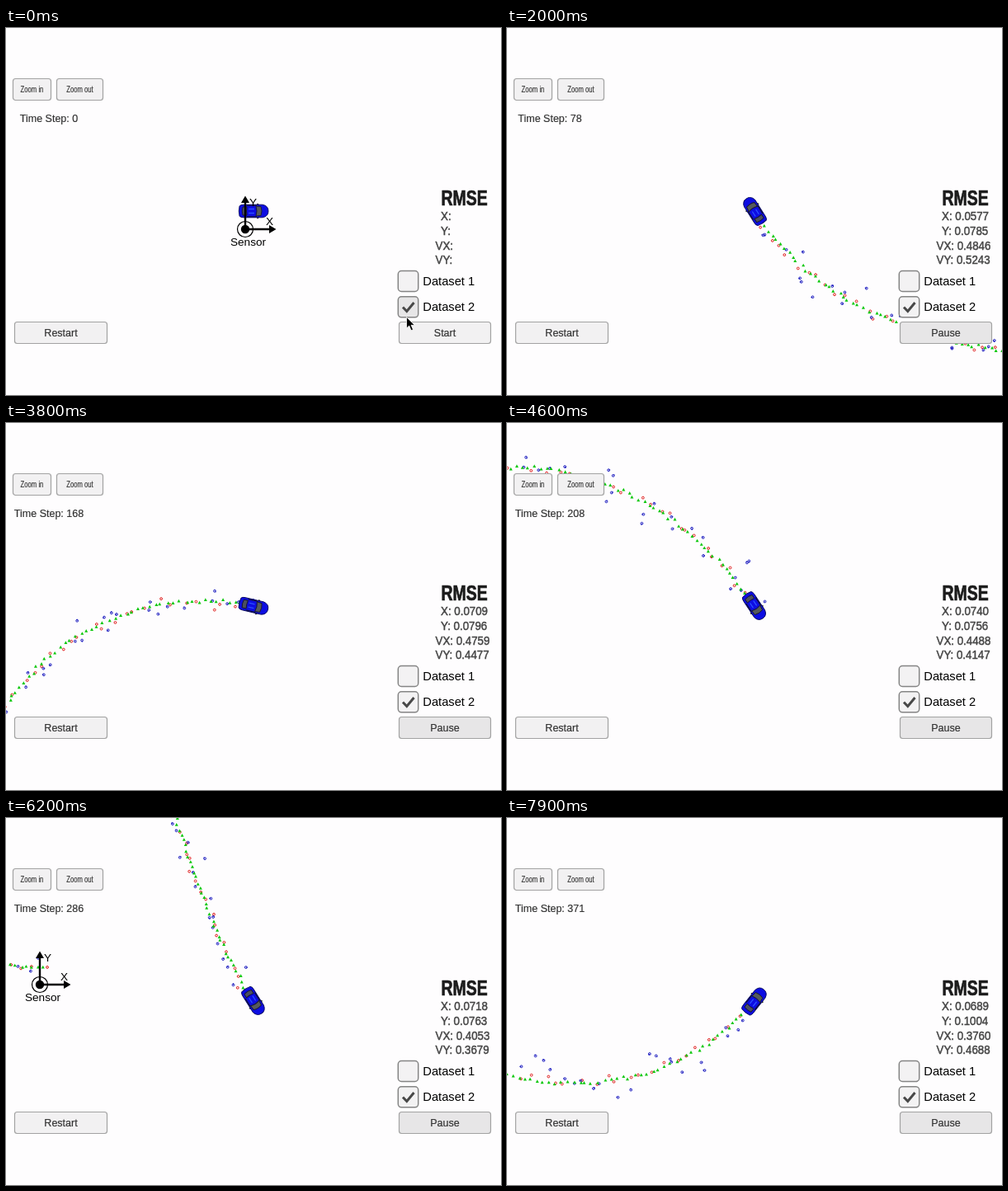
These frames come from a looping animation (600x445 px, 8000 ms). An HTML page:

```html
<!DOCTYPE html>
<html lang="en">
<head>
<meta charset="utf-8">
<title>Tracking simulator</title>
<style>
  html, body { margin: 0; width: 100%; height: 100%; overflow: hidden; background: #fefdfe; }
  svg { display: block; width: 100vw; height: 100vh; }
  text { font-family: "Liberation Sans", Arial, sans-serif; }
  .ui { fill: #333; stroke: #333; stroke-width: .2; font-size: 12.5px; text-anchor: middle; }
  .rmse { fill: #444; stroke: #444; stroke-width: .5; font-size: 15.5px; }
</style>
</head>
<body>
<svg id="stage" viewBox="0 0 600 445" xmlns="http://www.w3.org/2000/svg">
  <rect width="600" height="445" fill="#fefdfe"/>
  <g id="trail">
    <path id="lidar" fill="none" stroke="#e01818"/>
    <path id="radar" fill="none" stroke="#1a1ac0"/>
    <path id="track" fill="#0cc80c"/>
  </g>
  <g id="car">
    <path d="M4.5 -9L6.5 -7M4.5 9L6.5 7" stroke="#111" stroke-width="1.4"/>
    <path d="M-17 -6Q-16 -7.8 -12 -7.8L11 -7.8Q18 -6.5 18 0Q18 6.5 11 7.8L-12 7.8Q-16 7.8 -17 6Q-18.5 0 -17 -6Z" fill="#0d0de2" stroke="#0a0a60" stroke-width=".9"/>
    <path d="M-8 -6.8H4M-8 6.8H4" stroke="#101040" stroke-width="1.3"/>
    <path d="M3 -6L9 -5.5Q11 0 9 5.5L3 6Q5 0 3 -6Z" fill="#555a5c" stroke="#181830" stroke-width=".9"/>
    <path d="M-8 -5L-13 -5Q-14.5 0 -13 5L-8 5Q-9 0 -8 -5Z" fill="#4c5060" stroke="#181830" stroke-width=".9"/>
    <path d="M-6 -2.5H1M-6 2.5H1" stroke="#2b50ff" stroke-width="1.3"/>
  </g>
  <g id="sensor">
    <g stroke="#000" stroke-width="2.4">
      <path d="M0 0V-34M0 0H31"/>
      <circle r="9.5" fill="none" stroke-width="1.2"/>
    </g>
    <path d="M0 -40.5L5 -32H-5ZM37.5 0L29 -5V5Z"/>
    <circle r="5.2"/>
    <g font-size="13.6" text-anchor="middle">
      <text x="3.5" y="20">Sensor</text>
      <text x="29.5" y="-5.5">X</text>
      <text x="9.5" y="-28.5">Y</text>
    </g>
  </g>
  <g id="panel"></g>
  <path id="cursor" d="M0 0V13.5L3.2 10.6L5.6 16.2L8 15.2L5.6 9.8H9.8Z" fill="#000" stroke="#fff" stroke-width=".8"/>
</svg>
<script>
const $ = id => document.getElementById(id);
const panel = $('panel');
const LOOP = 8000, CAR = [300, 222];

function add(tag, attrs, text = '') {
  const el = document.createElementNS('http://www.w3.org/2000/svg', tag);
  for (const name in attrs) el.setAttribute(name, attrs[name]);
  el.textContent = text;
  return panel.appendChild(el);
}

function box(x, y, width, height, fill, rx = 3, stroke = '#a2a2a2', sw = 1.2) {
  return add('rect', { x, y, width, height, rx, fill, stroke, 'stroke-width': sw });
}

function button(x, y, w, h, label, narrow = 1) {
  const rect = box(x, y, w, h, '#f2f1f2');
  const size = narrow < 1 ? 11 : 12.5;
  const text = add('text', {
    class: 'ui', style: `font-size:${size}px`,
    transform: `translate(${x + w / 2} ${y + h / 2 + size * .35}) scale(${narrow} 1)`
  }, label);
  return { rect, text };
}

function checkbox(y, label) {
  const rect = box(475.3, y, 24.4, 25, '#f3f2f3', 4, '#858585', 1.5);
  add('text', { x: 505.3, y: y + 17.5, 'font-size': 14.7 }, label);
  return rect;
}

// Interface
button(8.5, 61.5, 46, 26, 'Zoom in', .7);
button(61.5, 61.5, 56, 26, 'Zoom out', .7);
button(10.5, 356.5, 112, 26, 'Restart');
const start = button(476.5, 356.5, 111, 26, 'Start');
checkbox(294.5, 'Dataset 1');
const chosen = checkbox(325.8, 'Dataset 2');
add('path', { d: 'M481 338.5L485.8 343.5L494.5 333', fill: 'none', stroke: '#484848', 'stroke-width': 3 });
const clock = add('text', { class: 'ui', x: 52, y: 114 });
add('text', {
  transform: 'translate(527.5 215) scale(.78 1)', 'font-size': 25, 'font-weight': 700,
  fill: '#1c1c1c', stroke: '#1c1c1c', 'stroke-width': .7
}, 'RMSE');
const rows = [['X', 527, 232.8], ['Y', 527, 250.8], ['VX', 520.5, 269.2], ['VY', 520.5, 286.4]].map(([name, x, y]) =>
  ({ name, el: add('text', { class: 'rmse', transform: `translate(${x} ${y}) scale(.86 1)` }) }));

// Linear interpolation through [key, ...values] rows
function lerpRows(table, key) {
  let i = 1;
  while (i < table.length - 1 && table[i][0] < key) i++;
  const a = table[i - 1], b = table[i];
  const u = Math.max(0, (key - a[0]) / (b[0] - a[0]));
  return a.slice(1).map((v, j) => v + (b[j + 1] - v) * u);
}

const STEPS = [[500, 1], [900, 21], [2000, 78], [3000, 128], [4600, 208], [6200, 286], [7900, 371]];
const ERRORS = [
  [1, .0420, .0510, .3600, .2900],
  [21, .0610, .0688, .8273, .6094],
  [78, .0577, .0785, .4846, .5243],
  [128, .0678, .0837, .5031, .4807],
  [208, .0740, .0756, .4488, .4147],
  [286, .0718, .0763, .4053, .3679],
  [371, .0689, .1004, .3760, .4688]
];

// Figure-eight path: the yaw rate follows one sine over the full run,
// and the car is a little faster in the tight turns
const COUNT = 380, PERIOD = 498, SWING = 2.2, LEAD = .03;
const phase = i => 2 * Math.PI * i / PERIOD;
const turn = i => SWING * (1 - Math.cos(phase(i))) + LEAD * Math.sin(phase(i));
const path = [[5, -22]];
for (let i = 1; i < COUNT; i++) {
  const a = turn(i - .5);
  const v = 6.85 * (1 + .1 * Math.sin(phase(i)) ** 2);
  path.push([path[i - 1][0] - v * Math.cos(a), path[i - 1][1] - v * Math.sin(a)]);
}
// Spread the small closing error evenly so the car passes this point
const PASS = 285, [px, py] = path[PASS];
const drift = [(259 - px) / PASS, (20 - py) / PASS];
path.forEach((p, i) => { p[0] += drift[0] * i; p[1] += drift[1] * i; });

// Seeded normal noise
let seed = 7;
const rand = () => (seed = seed * 16807 % 2147483647) / 2147483647;
const noise = s => s * (rand() + rand() + rand() + rand() - 2) * 1.73;

const ring = (x, y) => `M${x - 1.4} ${y}a1.4 1.4 0 1 0 2.8 0a1.4 1.4 0 1 0 -2.8 0`;
const marks = { track: [], lidar: [], radar: [] };
path.forEach(([x, y], i) => {
  const gx = x + noise(1.2), gy = y + noise(1.2);
  marks.track.push(`M${gx} ${gy - 2}l2 3.7h-4z`);
  if (i % 2 === 0) {
    marks.lidar.push(ring(x + noise(3.8), y + noise(3.8)));
    marks.radar.push('');
  } else {
    const r = Math.hypot(x, y), along = noise(7), side = noise(.026 * r);
    const bx = x + (x * along - y * side) / r, by = y + (y * along + x * side) / r;
    const a = rand() * 6.28;
    marks.radar.push(ring(bx, by) + `M${bx} ${by}l${2 * Math.cos(a)} ${2 * Math.sin(a)}`);
    marks.lidar.push('');
  }
});

function render(ms) {
  const t = Math.floor(ms / 100) * 100;
  const running = t >= 500;
  const step = running ? Math.round(lerpRows(STEPS, t)[0]) : 0;
  const [x, y] = running ? path[step - 1] : [10, -22];
  for (const id of ['trail', 'sensor']) {
    $(id).setAttribute('transform', `translate(${CAR[0] - x} ${CAR[1] - y})`);
  }
  const angle = running ? turn(step) * 180 / Math.PI - 180 : 0;
  $('car').setAttribute('transform', `translate(${CAR}) rotate(${angle})`);
  for (const id in marks) $(id).setAttribute('d', marks[id].slice(0, step).join(''));

  clock.textContent = 'Time Step: ' + step;
  const errors = lerpRows(ERRORS, step);
  rows.forEach((row, i) => {
    row.el.textContent = row.name + ':' + (running ? ' ' + errors[i].toFixed(4) : '');
  });
  start.text.textContent = running ? 'Pause' : 'Start';
  start.rect.setAttribute('fill', running ? '#e7e6e7' : '#f2f1f2');
  chosen.setAttribute('fill', running ? '#f3f2f3' : '#e7e6e7');
  $('cursor').setAttribute('transform', t < 100 ? 'translate(485.5 350.5)' : 'translate(488.8 366)');
  $('cursor').setAttribute('visibility', t < 300 ? 'visible' : 'hidden');
}

const origin = performance.now();
function tick() {
  render((performance.now() - origin) % LOOP);
  requestAnimationFrame(tick);
}
tick();
</script>
</body>
</html>
```
